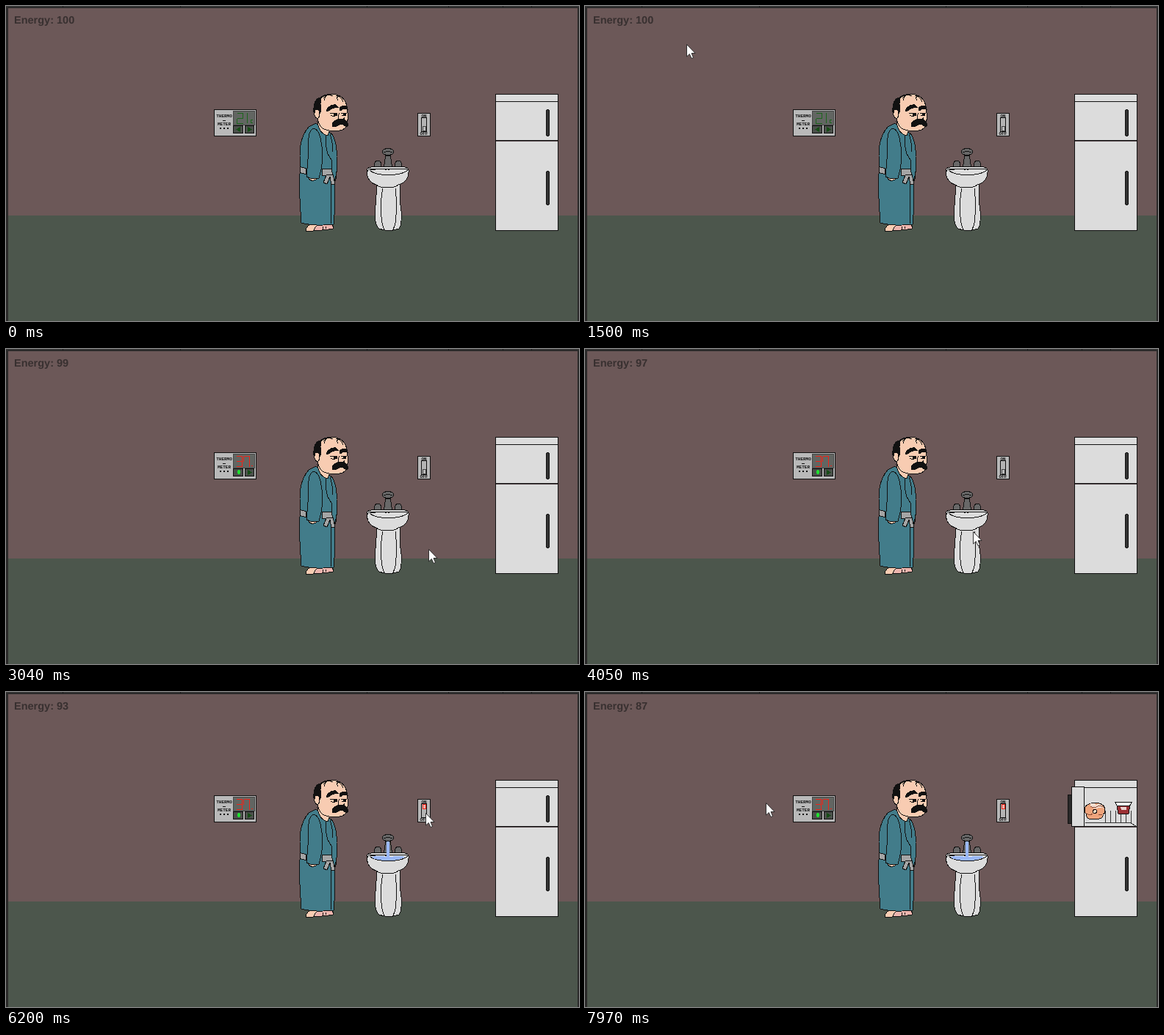
Animation, 780 px wide and 430 px high, one loop 8000 ms. Source, as an HTML page:

```html
<!DOCTYPE html>
<html lang="en">
<head>
<meta charset="utf-8">
<title>Energy</title>
<style>
html, body { margin: 0; width: 100%; height: 100%; overflow: hidden; background: #2b2a2a; }
svg { display: block; width: 780px; height: 430px; }
.art { shape-rendering: crispEdges; stroke: #111; stroke-width: 1; fill: none; }
.none { stroke: none; }
.white { fill: #dcdcdc; }
.metal { fill: #686868; }
.plate { fill: #b9b9b9; }
.skin { fill: #f8ccb2; }
.robe { fill: #427c8a; }
.belt { fill: #a5a5a5; }
.ink { fill: #111; }
.tiny { font: bold 6px "Liberation Mono", monospace; fill: #111; stroke: none; text-anchor: middle; }
#energy { font: bold 14.5px "Liberation Sans", Arial, sans-serif; fill: #383030; text-rendering: geometricPrecision; }
</style>
</head>
<body>
<svg viewBox="0 0 780 430">
  <rect width="780" height="430" fill="#2b2a2a"/>
  <path d="M0 .5H780" stroke="#383838"/>
  <path d="M77.5 0v2M237.5 0v2M491.5 0v2M602.5 0v2M676.5 0v2M715.5 0v2" stroke="#1b1b1b"/>
  <rect x="3" y="3" width="775" height="283" fill="#6c5858"/>
  <rect x="3" y="286" width="775" height="144" fill="#4c564c"/>
  <text id="energy" x="11" y="24">Energy: 100</text>

  <!-- thermometer -->
  <g class="art">
    <rect class="plate" x="283.5" y="141.5" width="57" height="36"/>
    <text class="tiny" x="297" y="152">THERMO</text>
    <path d="M295 156.5h4"/>
    <text class="tiny" x="297" y="163">METER</text>
    <path d="M291 166.5h2M296 166.5h2M301 166.5h2" stroke-width="2"/>
    <rect x="309" y="143" width="29" height="19" fill="#626662" stroke="#444"/>
    <rect x="309.5" y="163.5" width="13" height="10" fill="#4b504b"/>
    <rect x="325.5" y="163.5" width="12" height="10" fill="#4b504b"/>
    <path class="none" d="M329 165l6 3.5l-6 3.5z" fill="#174d17"/>
    <path id="arrow" class="none" d="M319 165l-6 3.5l6 3.5z" fill="#174d17"/>
    <path id="lit" class="none" d="M317 164l2.500 4l-2.500 4l-2.500-4z" fill="#20e030"/>
    <path id="digits"/>
  </g>

  <!-- switch -->
  <g class="art">
    <rect class="plate" x="560.5" y="146.5" width="17" height="31"/>
    <text class="tiny" x="569" y="152">ON</text>
    <text class="tiny" x="569" y="176">OFF</text>
    <rect x="565.5" y="152.5" width="7" height="19" fill="#b4b4b4"/>
    <rect id="lever" x="567.5" width="4" height="6"/>
  </g>

  <!-- fridge -->
  <g class="art">
    <rect class="white" x="666.5" y="120.5" width="85" height="186"/>
    <path d="M667 130.5h84M667 183.5h84"/>
    <path d="M667 184.500h84" stroke="#55484a"/>
    <rect x="735.5" y="225.5" width="4" height="46" rx="2" fill="#333"/>
    <rect id="shut" x="735.5" y="141.5" width="4" height="36" rx="2" fill="#333"/>
    <g id="open">
      <rect class="white" x="679.5" y="130.5" width="72" height="53"/>
      <path id="grille" stroke="#333"/>
      <path d="M742 178l9 6" stroke="#333"/>
      <path fill="#eea47c" d="M680 161q0-6 6-8q7-3 14-1q8 2 8 10q0 4-3 5q1 5-5 6q-7 2-14 0q-4-1-3-6q-3-2-3-6z"/>
      <path d="M688 152q5-1 8 2q4-2 7 0l3 5q-5-3-9 0q-5 1-9-3z" fill="#f4ddd0" stroke="none"/>
      <path d="M688 156q4 3 8 1q4-3 9 0M683 166q5 3 8 0M699 167q3 2 5 0" stroke="#8a4c34"/>
      <circle cx="694" cy="163" r="2.500" fill="#f8d7c0"/>
      <path d="M724 155h18l-2 11h-14z" fill="#9b3034"/>
      <path d="M721.500 150.500h23l-3 5h-17z" fill="#f2f2f2"/>
      <path d="M729 157h8v4h-7z" fill="#ead2ce" stroke="none"/>
      <rect class="white" x="662.5" y="129.5" width="17" height="54"/>
      <rect x="657.5" y="140.5" width="5" height="39" fill="#2a2a2a"/>
    </g>
  </g>

  <!-- sink -->
  <g class="art">
    <path class="white" d="M504 240Q505 262 502 280Q502 300 508 304Q521 309 535 304Q539 300 538 280Q535 262 537 240z"/>
    <path d="M513 249Q508 272 512 296Q513 302 515 305M530 249Q533 272 530 296Q529 301 527 305"/>
    <path class="white" d="M491 224Q491 220 503 219H537Q548 220 548 224Q549 240 534 244Q530 248 520 248Q508 248 504 244Q491 240 491 224z"/>
    <path d="M492 226Q492 222 500 222H540Q548 223 546 225Q540 229 530 230H511Q500 229 495 224"/>
    <path d="M496 223.5h7M516 223.5h2M520 223.5h2"/>
    <path class="metal" d="M514.500 219L517 203h6l2.500 16z"/>
    <ellipse class="metal" cx="520" cy="199" rx="8" ry="4.500"/>
    <path d="M514 200q6-3 12 0M517 204h7"/>
    <path class="metal" d="M501 219q0-8 5-8q5 0 5 8zM529 219q0-8 5-8q5 0 5 8z"/>
    <g id="tap" class="none" fill="#9ab8f8">
      <path d="M497 225Q508 223 519 225H523Q534 223 544 225Q537 229 530 229.500H511Q502 229 497 225z"/>
      <rect x="518" y="204" width="4" height="22"/>
    </g>
  </g>

  <!-- man -->
  <g class="art">
    <path class="skin" d="M408 306q2-7 8-9h8v9q-8 2-16 1z"/>
    <path d="M419 306q3-8 10-8h14q4 4 2 6q-12 3-26 2z" fill="#edb5ae"/>
    <path d="M431 305v-4M435 304v-3"/>
    <path class="skin" d="M443 229l7 1q0 6-3 11l-4-3z"/>
    <path class="robe" d="M422 160L412 165Q403 176 401 190Q399 204 401 220L399 238Q400 270 402 296Q420 301 446 298Q449 268 447 241L449 232Q452 220 450 206Q451 190 446 179Q443 172 436 171z"/>
    <path class="belt" d="M400 219.500l8 2v8l-8-2zM430 222l13 1l2 8l-15 1z"/>
    <path class="belt" d="M436 231l-4 10l5 2l4-10l2 11l5-1l-3-13z"/>
    <path d="M442.500 244V297M436 177Q434 188 438 202L443 210V223M441 175Q445 186 445 199"/>
    <path class="skin" d="M412 233h13q-2 5-6 5q-5 1-7-3z"/>
    <path class="robe" d="M420 167Q413 168 412 180Q412 205 409 233Q416 237 426 235Q430 222 431 207Q431 193 428 180Q426 171 420 167z"/>
    <path class="skin" d="M424 158Q426 174 438 177L441 168z"/>
    <path class="skin" d="M426 127Q433 120 444 120Q456 121 461 129Q465 136 465 146Q466 154 464 162Q462 169 454 170Q440 172 431 167Q425 162 424 152Q420 145 426 127z"/>
    <path class="ink" d="M427 125Q419 128 419 139Q418 148 422 152L426 150L429 142Q427 134 429 125z"/>
    <path class="skin" d="M421 142q5-2 6 4q0 6-3 8q-5-3-4-8z"/>
    <path d="M428 127Q433 120 446 121M432 126q5-7 13-3M449 122q8 2 10 9M437 121q-4 4-3 8M453 122q-4 3-1 7"/>
    <path class="ink" d="M436 143l2-4q6-5 11-4l3 3q-7 0-14 6zM454 139q5-4 9-2l2 4q-5-2-10 2z"/>
    <path d="M441 147l10-1M442 149q4 3 8 0M456 146h8M457 149h6"/>
    <path class="ink" d="M446 147h4v2h-4zM459 147h3v2h-3z"/>
    <path d="M454 146Q451 151 453 155Q459 156 461 152"/>
    <path class="ink" d="M444 164q0-6 5-8q4-3 7-1q4-2 7 2q3 3 2 7q-4 1-6-2q-4-2-7 1q-4 3-8 1z"/>
  </g>

  <path id="cursor" d="M.5 .5V17L4.300 13.500L7 19.500L9.500 18.500L7 12.500H12z" fill="#fff" stroke="#222" stroke-width=".9"/>
</svg>
<script>
const LOOP = 8000, STEP = 77, START = 268;
const $ = id => document.getElementById(id);

// pointer stops: time, x, y
const path = [
  [268, 541, 370], [500, 400, 215], [880, 57, 35], [1030, 57, 35], [1190, 39, 18], [1345, 62, 25],
  [1500, 138, 52], [1800, 324, 136], [1885, 318, 162], [2110, 316, 165],
  [2345, 478, 227], [2650, 474, 224], [2960, 579, 275], [3420, 529, 250],
  [3500, 529, 250], [3570, 528, 249], [4270, 528, 249], [4880, 570, 165],
  [5200, 571, 165], [6190, 571, 165], [6810, 677, 204], [6960, 679, 204],
  [7660, 679, 204], [7737, 678, 209], [7965, 246, 151]
];
// moments at which the counter drops by one
const drops = [2190, 3120, 4050, 4670, 5130, 5590, 6050, 6430, 6740, 6970, 7280, 7510, 7820];
const HEAT = 2110, WATER = 4280, LIGHT = 6050, FREEZER = 7510;

// seven-segment strokes: column, row, direction
const segs = { a: [0, 0, "h"], b: [1, 0, "v"], c: [1, 1, "v"], d: [0, 2, "h"], e: [0, 1, "v"], f: [0, 0, "v"], g: [0, 1, "h"] };
const digit = (x, on) => [...on].map(k => {
  const [col, row, dir] = segs[k];
  return `M${x + col * 8} ${146.5 + row * 7}${dir}${dir === "h" ? 8 : 7}`;
}).join("");
const cool = digit(314.5, "abged") + "M328.5 146v14M333 155.500h3M333.500 155v4M333 159.500h3";
const hot = digit(313.5, "abgcd") + digit(323.5, "fabc") + "M334 159.500h2";

let bars = "M681 178.500h61";
for (let x = 708; x < 745; x += 7) bars += `M${x}.5 162v16`;
$("grille").setAttribute("d", bars);

function pointer(t) {
  let i = 1;
  while (i < path.length - 1 && path[i][0] < t) i++;
  const [a, b] = [path[i - 1], path[i]];
  let k = Math.min(1, Math.max(0, (t - a[0]) / (b[0] - a[0])));
  k = k * k * (3 - 2 * k);
  return [1, 2].map(n => Math.round(a[n] + (b[n] - a[n]) * k));
}

const show = (id, on) => $(id).setAttribute("visibility", on ? "visible" : "hidden");

function draw(t) {
  $("energy").textContent = "Energy: " + (100 - drops.filter(d => d <= t).length);

  const warm = t >= HEAT, light = t >= LIGHT, open = t >= FREEZER;
  $("digits").setAttribute("d", warm ? hot : cool);
  $("digits").setAttribute("stroke", warm ? "#f02418" : "#1d651d");
  show("arrow", !warm);
  show("lit", warm);
  show("tap", t >= WATER);

  $("lever").setAttribute("y", light ? 153.5 : 164.5);
  $("lever").setAttribute("fill", light ? "#e8b0aa" : "#bcbcbc");
  $("lever").setAttribute("stroke", light ? "#f02418" : "#444");
  show("open", open);
  show("shut", !open);

  show("cursor", t >= START);
  const s = START + Math.floor((t - START) / STEP) * STEP;
  $("cursor").setAttribute("transform", `translate(${pointer(s)})`);
}

const begin = performance.now();
function tick() {
  draw((performance.now() - begin) % LOOP);
  requestAnimationFrame(tick);
}
draw(0);
requestAnimationFrame(tick);
</script>
</body>
</html>
```
